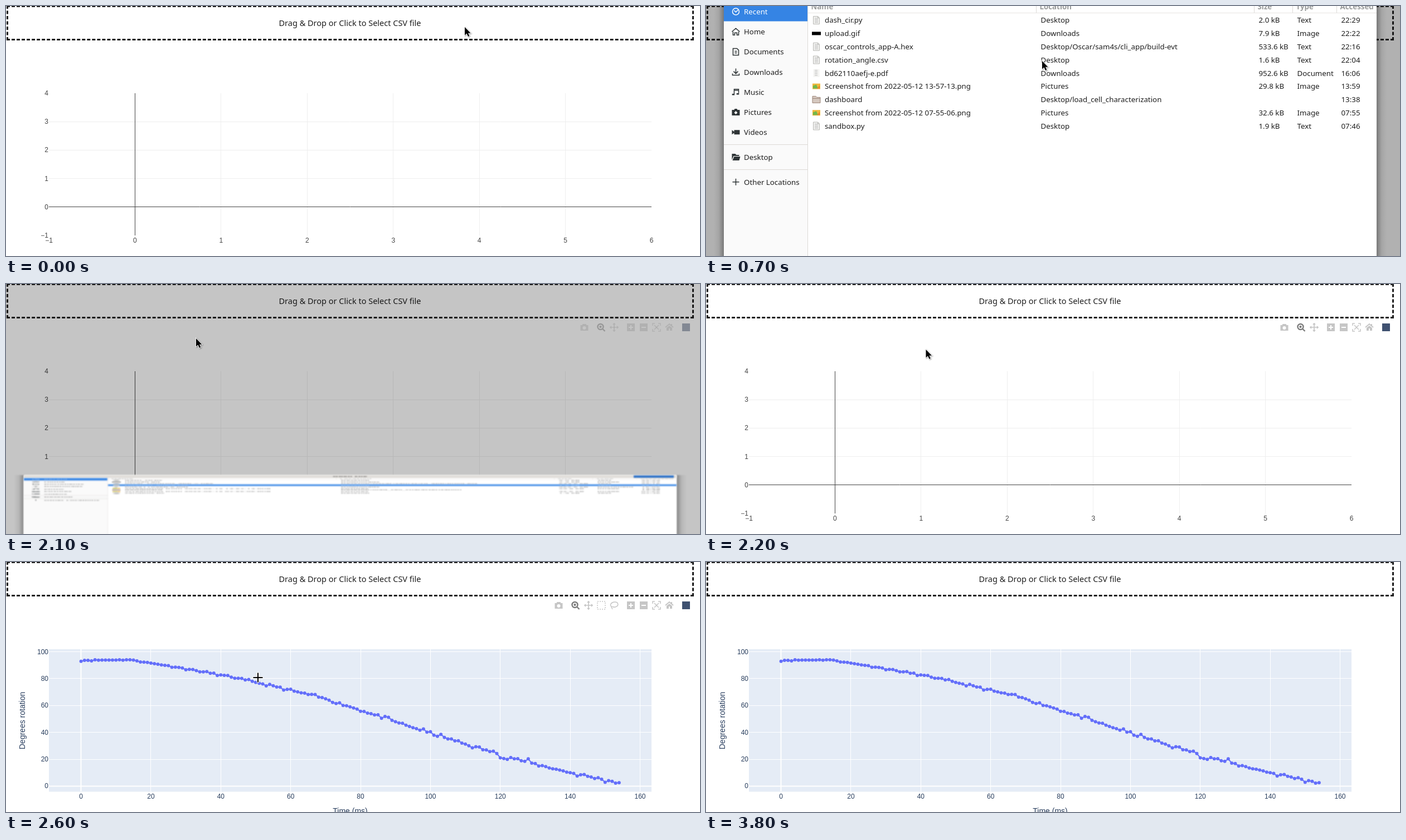
Recreate the animation shown at these times as an HTML page with a canvas. Size 1245 px wide and 450 px high, loop 4 s.

```html
<!DOCTYPE html>
<html lang="en">
<head>
<meta charset="utf-8">
<title>CSV upload</title>
<style>
  html, body { margin: 0; width: 100%; height: 100%; overflow: hidden; background: #fff; }
  canvas { display: block; }
</style>
</head>
<body>
<canvas id="stage" width="1245" height="450"></canvas>
<script>
const ctx = document.getElementById('stage').getContext('2d');
const LOOP = 4000, STEP = 100;
const UI = '"Noto Sans", sans-serif', UI_FONT = '13.3px ' + UI, UI_BOLD = 'bold ' + UI_FONT;
const PLOT = '"Liberation Sans", Arial, sans-serif', TICK = '12px ' + PLOT, TITLE = '14px ' + PLOT;
const BLUE = '#3584e4', INK = '#1e1e1e', GRAY = '#c6c6c6';
const plot = { left: 77, top: 157, right: 1158, bottom: 413 };

const pointerStops = [
  { at: 0, x: 823, y: 38 }, { at: 400, x: 823, y: 38 }, { at: 700, x: 603, y: 99 },
  { at: 800, x: 483, y: 106 }, { at: 1400, x: 341, y: 98 }, { at: 2100, x: 341, y: 98 },
  { at: 2300, x: 448, y: 138 }, { at: 2400, x: 452, y: 208 }, { at: 3000, x: 452, y: 208 },
  { at: 3100, x: 442, y: 157 }, { at: 3600, x: 73, y: 10 }, { at: 3800, x: 35, y: -16 },
  { at: LOOP, x: 35, y: -16 }
];

const SAMPLES = 155;
const trend = [93.6, 94, 88.3, 81.7, 73.8, 65, 53, 41, 29.6, 19, 10, 2.5]; // evenly spaced

// Sidebar entries; each group is followed by a separator
const places = [
  [
    ['Recent', 'M-6 0A6 6 0 1 0 6 0A6 6 0 1 0 -6 0M-3 -2L0 1L4 -3'],
    ['Home', 'M-7 0L0 -6L7 0M-5 0V6H-2V2H2V6H5V0'],
    ['Documents', 'M-5 -6H2L5 -3V6H-5ZM-2 -1H2M-2 2H2'],
    ['Downloads', 'M0 -6V3M-4 -1L0 3L4 -1M-6 3V6H6V3'],
    ['Music', 'M-3 4V-5H5V2M-3 -3H5M-6 4H-3V5H-6ZM2 3H5V4H2Z'],
    ['Pictures', 'M-7 -4H-3L-2 -6H2L3 -4H7V6H-7ZM-3 1L0 4L3 1L0 -2Z', true],
    ['Videos', 'M-3 -4H7V4H-3V1L-7 4V-4L-3 -1Z', true]
  ],
  [['Desktop', 'M-7 -6H-1L1 -4H6V-2H-4L-7 5ZM-3 -1H8L6 6H-6Z', true]],
  [['Other Locations', 'M-6 0H6M0 -6V6']]
];

const columns = [['Name', 182.5], ['Location', 592.5], ['Size', 983.5], ['Type', 1052.5], ['Accessed', 1131.5]];
const files = [
  ['dash_cir.py', 'Desktop', '2.0 kB', 'Text', '22:29'],
  ['upload.gif', 'Downloads', '7.9 kB', 'Image', '22:22'],
  ['oscar_controls_app-A.hex', 'Desktop/Oscar/sam4s/cli_app/build-evt', '533.6 kB', 'Text', '22:16'],
  ['rotation_angle.csv', 'Desktop', '1.6 kB', 'Text', '22:04'],
  ['bd62110aefj-e.pdf', 'Downloads', '952.6 kB', 'Document', '16:06'],
  ['Screenshot from 2022-05-12 13-57-13.png', 'Pictures', '29.8 kB', 'Image', '13:59'],
  ['dashboard', 'Desktop/load_cell_characterization', '', '', '13:38'],
  ['Screenshot from 2022-05-12 07-55-06.png', 'Pictures', '32.6 kB', 'Image', '07:55'],
  ['sandbox.py', 'Desktop', '1.9 kB', 'Text', '07:46']
];

const mix = (a, b, k) => a + (b - a) * k;
const crisp = v => Math.floor(v) + 0.5;

function rect(x, y, w, h, color) {
  ctx.fillStyle = color;
  ctx.fillRect(x, y, w, h);
}

function line(x1, y1, x2, y2, color, width = 1) {
  ctx.strokeStyle = color;
  ctx.lineWidth = width;
  ctx.beginPath();
  ctx.moveTo(x1, y1);
  ctx.lineTo(x2, y2);
  ctx.stroke();
}

function text(str, x, y, font, color, align = 'left') {
  ctx.font = font;
  ctx.fillStyle = color;
  ctx.textAlign = align;
  ctx.fillText(str, x, y);
}

function outline(path, x, y, color, width = 1.5) {
  ctx.save();
  ctx.translate(x, y);
  ctx.strokeStyle = color;
  ctx.lineWidth = width;
  ctx.stroke(new Path2D(path));
  ctx.restore();
}

function solid(path, x, y, color) {
  ctx.save();
  ctx.translate(x, y);
  ctx.fillStyle = color;
  ctx.fill(new Path2D(path), 'evenodd');
  ctx.restore();
}

function seededRandom(seed) {
  return () => (seed = (seed * 16807) % 2147483647) / 2147483647;
}

// Noise grows along the curve, with a few stronger spikes
function makeCurve() {
  const random = seededRandom(11), spacing = (SAMPLES - 1) / (trend.length - 1);
  return Array.from({ length: SAMPLES }, (_, i) => {
    const k = Math.min(Math.floor(i / spacing), trend.length - 2);
    const noise = (random() * 2 - 1) ** 3;
    return mix(trend[k], trend[k + 1], i / spacing - k) + noise * (0.7 + 3 * (i / SAMPLES) ** 2);
  });
}
const curve = makeCurve();

function pointerAt(t) {
  const i = pointerStops.findIndex(stop => stop.at > t);
  const a = pointerStops[i - 1], b = pointerStops[i], k = (t - a.at) / (b.at - a.at);
  return [mix(a.x, b.x, k), mix(a.y, b.y, k)];
}

function dashedLine(x1, y1, x2, y2) {
  const length = Math.hypot(x2 - x1, y2 - y1), count = Math.round((length + 3) / 9);
  ctx.setLineDash([6, (length - count * 6) / (count - 1)]);
  line(x1, y1, x2, y2, INK, 3);
  ctx.setLineDash([]);
}

function drawDropZone() {
  for (const y of [0.5, 60.5]) dashedLine(1, y, 1234, y);
  for (const x of [2.5, 1232.5]) dashedLine(x, -1, x, 62);
  text('Drag & Drop or Click to Select CSV file', 617, 36, '14.5px ' + UI, INK, 'center');
}

function gridX(x, color, width) {
  line(crisp(x), plot.top, crisp(x), plot.bottom, color, width);
}

function gridY(y, color, width) {
  line(plot.left, crisp(y), plot.right, crisp(y), color, width);
}

function tickX(v, x, color) {
  text(String(v).replace('-', '\u2212'), x, 426, TICK, color, 'center');
}

function tickY(v, y, color) {
  text(String(v).replace('-', '\u2212'), 76, y + 4, TICK, color, 'right');
}

function drawEmptyPlot() {
  const xAt = v => mix(plot.left, plot.right, (v + 1) / 7);
  const yAt = v => mix(plot.bottom, plot.top, (v + 1) / 5);
  for (let v = 1; v < 6; v++) gridX(xAt(v), '#eee');
  for (let v = 1; v < 4; v++) gridY(yAt(v), '#eee');
  gridX(xAt(0), '#444');
  gridY(yAt(0), '#444');
  for (let v = -1; v <= 6; v++) tickX(v, xAt(v), '#444');
  for (let v = -1; v <= 4; v++) tickY(v, yAt(v), '#444');
}

function drawDataPlot() {
  const ink = '#2a3f5f';
  const xAt = v => 134.6 + v * 6.268, yAt = v => 403.4 - v * 2.419;
  rect(plot.left, plot.top, plot.right - plot.left, plot.bottom - plot.top + 0.5, '#e5ecf6');
  for (let v = 0; v <= 160; v += 20) {
    gridX(xAt(v), '#fff', v ? 1 : 2);
    tickX(v, xAt(v), ink);
  }
  for (let v = 0; v <= 100; v += 20) {
    gridY(yAt(v), '#fff', v ? 1 : 2);
    tickY(v, yAt(v), ink);
  }
  text('Time (ms)', 617.5, 452.5, TITLE, ink, 'center');
  ctx.save();
  ctx.translate(33.5, 285.5);
  ctx.rotate(-Math.PI / 2);
  text('Degrees rotation', 0, 0, TITLE, ink, 'center');
  ctx.restore();

  const trace = new Path2D(), dots = new Path2D();
  curve.forEach((value, i) => {
    const x = xAt(i), y = yAt(value);
    trace.lineTo(x, y);
    dots.moveTo(x + 3, y);
    dots.arc(x, y, 3, 0, 7);
  });
  ctx.strokeStyle = ctx.fillStyle = '#636efa';
  ctx.lineWidth = 2;
  ctx.stroke(trace);
  ctx.fill(dots);
}

function drawToolbar(hasData) {
  const y = 78, shift = hasData ? -46 : 0;
  solid('M-7 -4H-4L-3 -6H3L4 -4H7V6H-7ZM-3 1A3 3 0 1 0 3 1A3 3 0 1 0 -3 1Z', 1037.5 + shift, y, GRAY);
  outline('M-6 -1A5 5 0 1 0 4 -1A5 5 0 1 0 -6 -1M3 3L7 7M-3 -1H1M-1 -3V1', 1067.5 + shift, y, '#7b7b7b', 2.4);
  for (let turn = 0; turn < 4; turn++) {
    ctx.save();
    ctx.translate(1091 + shift, y);
    ctx.rotate(turn * Math.PI / 2);
    outline('M0 0H7M5 -2L7 0L5 2', 0, 0, GRAY, 1.7);
    ctx.restore();
    ctx.save();
    ctx.translate(1167, y);
    ctx.rotate(turn * Math.PI / 2);
    outline('M0 0L4 4M3 7H7V3', 0, 0, GRAY);
    ctx.restore();
  }
  if (hasData) {
    ctx.setLineDash([2, 2]);
    outline('M-7 -7H7V7H-7Z', 1068, y, GRAY);
    ctx.setLineDash([]);
    outline('M-4 3C-10 -1 -4 -6 1 -6C8 -6 9 1 2 3C-1 4 -4 1 -5 3L-3 7', 1091, y, GRAY);
  }
  solid('M-7 -7H7V7H-7ZM-4 -1V1H-1V4H1V1H4V-1H1V-4H-1V-1Z', 1121, y, GRAY);
  solid('M-7 -7H7V7H-7ZM-4 -1V1H4V-1Z', 1144, y, GRAY);
  outline('M-7 0L0 -6L7 0M4 -6V-3', 1190, y, GRAY, 2);
  solid('M-5 1L0 -3L5 1V6H1V2H-1V6H-5Z', 1190, y, GRAY);
  rect(1213, y - 7, 14, 14, '#3f5170');
}

const fileIcons = {
  page(x, y) {
    rect(x - 5.5, y - 7, 11, 14, '#f1f1ef');
    outline('M-5.5 -7H2.5L5.5 -4V7H-5.5ZM2.5 -7V-4H5.5', x, y, '#b9b9b5', 1);
    for (let dy = -3.5; dy < 5; dy += 2.5) line(x - 3, y + dy, x + 3, y + dy, '#bbb');
  },
  pdf(x, y) {
    rect(x - 5.5, y - 7, 11, 14, '#f4f4f2');
    for (let dy = -5; dy < 5; dy += 3) line(x - 3, y + dy, x + 2, y + dy, '#bbb');
  },
  gif(x, y) {
    rect(x - 8, y - 3, 16, 6, '#000');
  },
  png(x, y) {
    rect(x - 7, y - 5, 14, 10, '#f0b73c');
    solid('M-6 4V-1L0 -3L3 4Z', x, y, '#73b84b');
    solid('M1 4L6 -2V4Z', x, y, '#e78332');
  },
  folder(x, y) {
    solid('M-7 -6H-1L1 -4H7V6H-7Z', x, y, '#d5c8bf');
    outline('M-7 -6H-1L1 -4H7V6H-7ZM-7 -2H7', x, y, '#9c8678', 1);
  }
};

function iconFor(name) {
  const extension = name.split('.')[1];
  return extension ? fileIcons[extension] || fileIcons.page : fileIcons.folder;
}

function edgeShadow(from, to) {
  const g = ctx.createLinearGradient(from, 0, to, 0);
  [0, 0.07, 0.32].forEach((alpha, i) => g.addColorStop(i / 2, `rgba(0,0,0,${alpha})`));
  rect(Math.min(from, to), -52, Math.abs(to - from), 902, g);
}

function drawSidebar() {
  const border = '#dcd9d6';
  let y = 10;
  rect(32, -8, 150, 858, '#fafafa');
  rect(32, -8, 150, 35.5, BLUE);
  line(182.5, -8, 182.5, 850, border);
  places.forEach((group, g) => {
    if (g) {
      line(32, crisp(y - 22.4), 182, crisp(y - 22.4), border);
    }
    for (const [name, path, filled] of group) {
      const active = name === 'Recent';
      (filled ? solid : outline)(path, 53.5, y, active ? '#fff' : '#2e3436');
      text(name, 68, y + 5, UI_FONT, active ? '#fff' : INK);
      y += 36.2;
    }
    y += 8.6;
  });
}

function drawFileList(selection) {
  columns.forEach(([title, edge], i) => {
    text(title, edge + 6, 6, UI_BOLD, '#9a9c9c');
    if (i) line(edge, -8, edge, 12, '#dcd9d6');
  });
  line(183, 12.5, 1203, 12.5, '#e6e4e2');

  files.forEach((cells, row) => {
    const y = 25.6 + row * 23.8, selected = cells[0].endsWith('.csv') && selection > 0;
    if (selected) {
      ctx.globalAlpha = selection;
      rect(183, 85, 1020, 23.5, BLUE);
      ctx.globalAlpha = 1;
    }
    iconFor(cells[0])(198, y);
    cells.forEach((cell, i) =>
      text(cell, columns[i][1] + (i ? 8 : 30.5), y + 4.8, UI_FONT, selected ? '#fff' : INK));
  });
}

function drawDialog(scaleY, selection) {
  ctx.save();
  ctx.translate(0, 399 * (1 - scaleY));
  ctx.scale(1, scaleY);
  if (scaleY < 1) ctx.filter = 'blur(0.8px)';
  edgeShadow(14, 32);
  edgeShadow(1221, 1203);
  rect(32, -52, 1171, 902, '#fff');
  rect(32, -52, 1171, 44, '#e1deda');
  text('Open File', 617, -26, UI_BOLD, INK, 'center');
  rect(1126, -47, 72, 34, '#2a70c8');
  drawSidebar();
  drawFileList(selection);
  ctx.restore();
}

function drawPointer(x, y, cross) {
  if (cross) {
    for (const [color, width, r] of [['#fff', 4, 9.5], ['#000', 2, 8.5]]) {
      line(x - r, y, x + r, y, color, width);
      line(x, y - r, x, y + r, color, width);
    }
    return;
  }
  const arrow = 'M0 0V14.5L3.5 11.5L6 17L8.3 16L6 10.7H10.5Z';
  ctx.save();
  ctx.shadowColor = 'rgba(0,0,0,.4)';
  ctx.shadowBlur = 2;
  ctx.shadowOffsetX = ctx.shadowOffsetY = 1;
  outline(arrow, x, y, '#fff', 1.6);
  ctx.restore();
  solid(arrow, x, y, '#000');
}

function draw(t) {
  const hasData = t >= 2600, opening = t < 400, closing = t >= 2100;
  rect(0, 0, 1245, 450, '#fff');
  drawDropZone();
  if (hasData) drawDataPlot(); else drawEmptyPlot();

  if (closing && t < 3500) {
    ctx.globalAlpha = t < 2200 ? 0.45 : 1;
    drawToolbar(hasData);
    ctx.globalAlpha = 1;
  }
  if (t >= 300 && t < 2200) {
    const shade = opening ? 0.15 : closing ? 0.228 : 0.306;
    const selection = Math.min(1, Math.max(0, (t - 1440) / 100));
    rect(0, 0, 1245, 450, `rgba(0,0,0,${shade})`);
    drawDialog(opening ? 0.5 : closing ? 0.122 : 1, selection);
  }

  const [x, y] = pointerAt(t);
  drawPointer(x, y, t >= 2300 && y >= plot.top);
}

const start = performance.now();
function tick() {
  const t = (performance.now() - start) % LOOP;
  draw(Math.floor(t / STEP) * STEP);
  requestAnimationFrame(tick);
}
tick();
</script>
</body>
</html>
```
